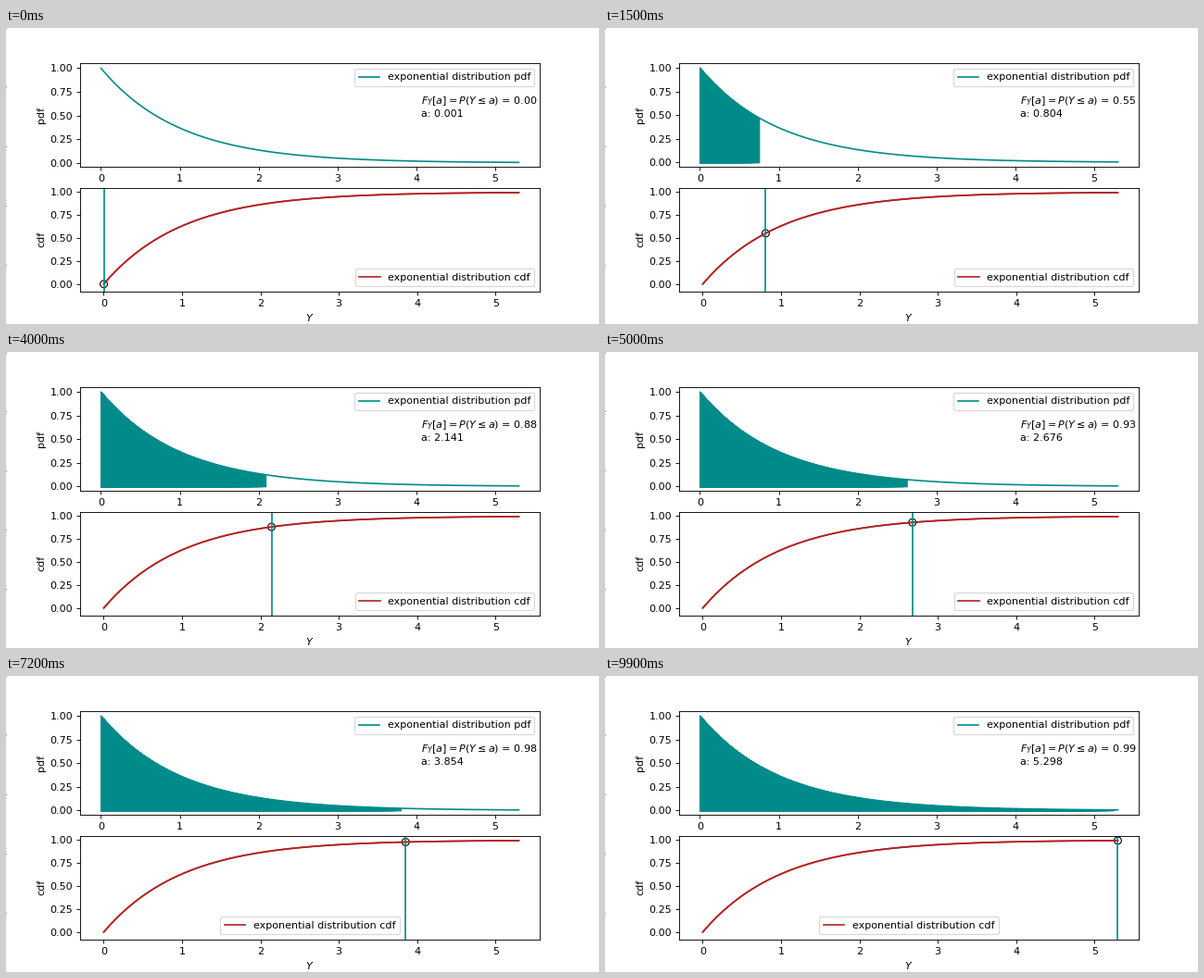
A matplotlib script for the animation above (10 s loop, 640x320 px).

```python
import numpy as np
import matplotlib.pyplot as plt
from matplotlib.animation import FuncAnimation

N = 100
TEAL, RED = "darkcyan", "firebrick"

plt.rcParams["font.family"] = "DejaVu Sans"


def padded(lo, hi, margin=0.05):
    pad = margin * (hi - lo)
    return lo - pad, hi + pad


# evenly spaced between the 0.1 % and 99.5 % quantiles
x = np.linspace(-np.log(0.999), -np.log(0.005), N)
pdf = np.exp(-x)
cdf = 1 - pdf

fig = plt.figure(figsize=(8, 4), dpi=80)
fig.add_axes([0, 0, 1, 1], frameon=False)
top, bottom = fig.subplots(2, 1)

top.plot(x, pdf, color=TEAL, label="exponential distribution pdf")
top.set_ylabel("pdf")
top.set_xlim(*padded(x[0], x[-1]))
top.legend(loc="upper right")

# stacked areas: their soft edges build up as the sweep advances
areas = [top.fill_between(x[:k], pdf[:k], color=TEAL, visible=False)
         for k in range(1, N)]

bottom.plot(x, cdf, color=RED, label="exponential distribution cdf")
bottom.plot(x, cdf, color=RED)
bottom.set_ylabel("cdf")
bottom.set_xlabel("$Y$")
bottom.set_xlim(*padded(-0.0342, x[-1]))
bottom.set_ylim(*padded(-0.0283, cdf[-1]))
marker = bottom.scatter(x[:1], cdf[:1], s=50, linewidths=1,
                        facecolors="none", edgecolors="black")
cursor = bottom.axvline(x[0], color=TEAL)
bottom.legend(loc="best")

note = fig.text(0.7, 0.7, "")


def update(i):
    a = x[i]
    for k, area in enumerate(areas, 1):
        area.set_visible(k <= i)
    top.set_ylim(*padded(0 if i else pdf[-1], pdf[0]))
    cursor.set_xdata([a, a])
    marker.set_offsets([(a, cdf[i])])
    prob = cdf[i] - 1e-9
    note.set_text(rf"$F_Y[a] = P(Y \leq a)$ = {prob:.2f}" + f"\na: {a:.3f}")


anim = FuncAnimation(fig, update, frames=N, init_func=lambda: update(0),
                     interval=100, repeat=True, repeat_delay=0)
plt.show()
```
